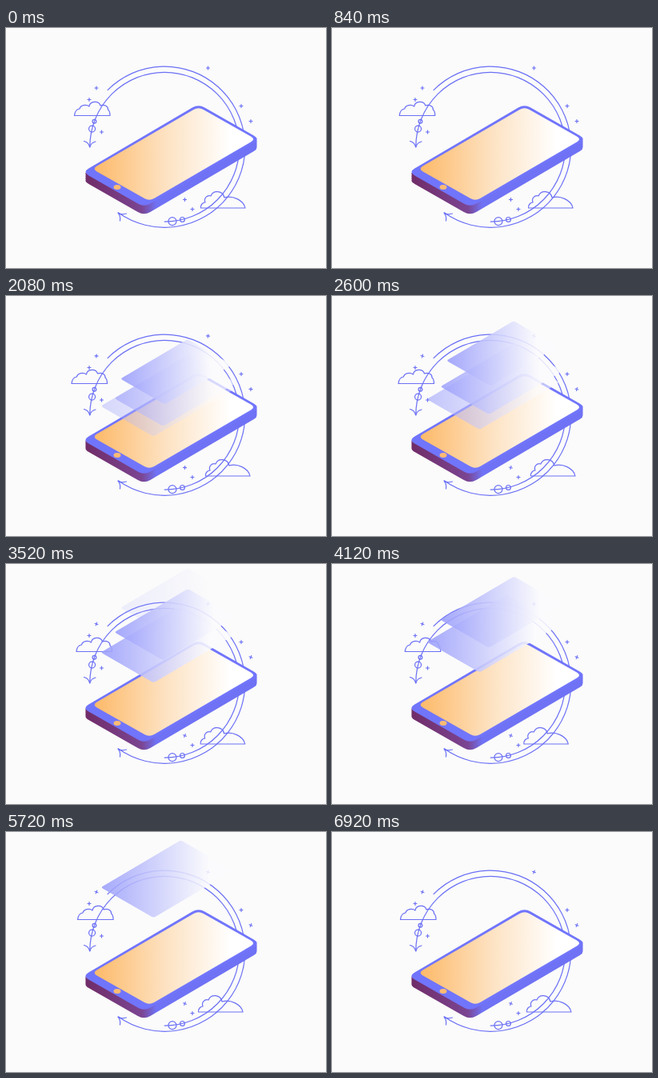
An HTML page that plays this animation: 400x300 px, repeating every 6.96 s.

```html
<!DOCTYPE html>
<html lang="en">
<head>
<meta charset="utf-8">
<title>Phone layers</title>
<style>
html, body { margin: 0; width: 100%; height: 100%; overflow: hidden; background: #fbfbfb; }
svg { display: block; width: 400px; height: 300px; }
.line { fill: none; stroke: #6b70f5; stroke-width: 1.2; stroke-linecap: round; stroke-linejoin: round; }
</style>
</head>
<body>
<svg viewBox="0 0 400 300">
  <defs>
    <linearGradient id="screenFill" gradientUnits="userSpaceOnUse" x1="110" y1="0" x2="290" y2="0">
      <stop offset="0" stop-color="#fdb968"/>
      <stop offset=".5" stop-color="#fde2c2"/>
      <stop offset=".95" stop-color="#fff"/>
    </linearGradient>
    <linearGradient id="sideFill" gradientUnits="userSpaceOnUse" x1="100" y1="0" x2="188" y2="0">
      <stop offset="0" stop-color="#702c68"/>
      <stop offset=".8" stop-color="#7b4592"/>
      <stop offset="1" stop-color="#6f72f4"/>
    </linearGradient>
    <linearGradient id="sheetFill">
      <stop offset="0" stop-color="#999dfb"/>
      <stop offset=".82" stop-color="#fbfbfd"/>
    </linearGradient>
  </defs>

  <g class="line">
    <g id="rings"></g>
    <path d="M97.500 141.500Q103.500 143 104.700 149Q106 143.500 112 142"/>
    <path d="M142.500 241Q143.500 235 140 231Q144 234 150.500 232"/>
    <g id="pluses"></g>
  </g>

  <g id="phone" transform="translate(-.4 0)"></g>

  <g class="line">
    <path id="cloudLeft" d="M.5 0C1 -5 3 -8 7 -8.500C8 -13 15 -14.500 19 -11.500C20 -18.500 31 -19 33 -12.500C38 -14.500 43 -11.500 42.500 -7.500C44.500 -6 45 -3 45 0Z"/>
    <path id="cloudRight" d="M.5 0C0 -4 3 -7 6 -7C4 -12 8 -16.500 13 -15C16 -23 28 -22 30 -13C40 -16 54 -10 56 0Z"/>
  </g>

  <g id="sheets"></g>
</svg>
<script>
const LOOP = 6960;
const $ = id => document.getElementById(id);
const clamp = v => Math.min(1, Math.max(0, v));
const ramp = (t, a, b) => clamp((t - a) / (b - a));
const ease = f => (1 - Math.cos(Math.PI * f)) / 2;
const mix = (a, b, f) => a + (b - a) * f;

function add(parent, tag, attrs) {
  const el = document.createElementNS("http://www.w3.org/2000/svg", tag);
  for (const k in attrs) el.setAttribute(k, attrs[k]);
  return parent.appendChild(el);
}

function move(el, x, y, angle = 0) {
  el.setAttribute("transform", `translate(${x} ${y}) rotate(${angle})`);
}

// Polygon path with softened corners
function rounded(points, r) {
  const n = points.length;
  const toward = (a, b) => {
    const dx = b[0] - a[0], dy = b[1] - a[1], k = r / Math.hypot(dx, dy);
    return [a[0] + dx * k, a[1] + dy * k];
  };
  return points.map((p, i) =>
    `${i ? "L" : "M"}${toward(p, points[(i + n - 1) % n])}Q${p} ${toward(p, points[(i + 1) % n])}`
  ).join("") + "Z";
}

// Parallelogram from its left corner and two edges
function slab([x, y], [ux, uy], [vx, vy]) {
  return [[x, y], [x + ux, y + uy], [x + ux + vx, y + uy + vy], [x + vx, y + vy]];
}

// Rings share one centre; angles in degrees, clockwise from the right
const outer = 100.6, inner = 93.4;
const polar = (r, deg) => {
  const a = deg * Math.PI / 180;
  return [198.2 + r * Math.cos(a), 148.7 + r * Math.sin(a)];
};
function arc(r, from, to) {
  add($("rings"), "path", { d: `M${polar(r, from)}A${r} ${r} 0 1 1 ${polar(r, to)}` });
}
function bead(deg, r) {
  const [cx, cy] = polar(inner, deg);
  add($("rings"), "circle", { cx, cy, r });
}
arc(outer, -135, 125);
arc(inner, -180, 90);
bead(194, 4);
bead(200, 2.4);
bead(84, 5);
bead(76.2, 2.9);

const phone = $("phone");
const bodyPath = rounded(slab([96, 180], [145, -85], [77, 44]), 9);
for (let d = 10.5; d > 0; d -= 1.5)
  add(phone, "path", { d: bodyPath, transform: `translate(0 ${d})`, fill: "url(#sideFill)" });
add(phone, "path", { d: bodyPath, fill: "#7175fb" });
add(phone, "path", { d: rounded(slab([108, 176], [133, -77.5], [71.5, 40.5]), 7), fill: "url(#screenFill)" });
add(phone, "ellipse", { cx: 139.4, cy: 199, rx: 4.5, ry: 2.9, fill: "#fdbb74" });

function plus([x, y]) {
  const el = add($("pluses"), "path", { d: "M-2 0H2M0 -2V2" });
  move(el, x, y);
  return { el, x, y };
}
const turning = [[252.5, 50], [113, 75], [306, 116.5], [223.5, 214.5]].map(plus);
[[104, 89.5], [119.5, 130], [294, 97.5], [233, 226.5]].forEach(plus);

// Each sheet rises from one height to another during its own span
const sheets = [
  { x: 118.5, scale: 1, start: 500, end: 7000, from: 150, to: 61 },
  { x: 135.5, scale: .92, start: 500, end: 5400, from: 150.5, to: 54.5 },
  { x: 143, scale: .84, start: 700, end: 3750, from: 140.6, to: 53.6 }
];
for (const s of sheets) {
  const edge = (x, y) => [x * s.scale, y * s.scale];
  s.el = add($("sheets"), "path", {
    d: rounded(slab([0, 0], edge(100, -59), edge(66, 38)), 3), fill: "url(#sheetFill)"
  });
}

// Clouds sway to one side, then the other, then back to rest
function sway(t, rest, first, second) {
  const a = 2080, b = 4720;
  if (t < a) return mix(rest, first, ease(t / a));
  if (t < b) return mix(first, second, ease(ramp(t, a, b)));
  return mix(second, rest, ease(ramp(t, b, LOOP)));
}

function draw(t) {
  move($("cloudLeft"), sway(t, 85, 81.5, 92), 109.5);
  move($("cloudRight"), sway(t, 243, 249, 238), 225);
  const tilt = 22 * ease(ramp(t, 1500, 3400));
  for (const p of turning) move(p.el, p.x, p.y, tilt);
  for (const s of sheets) {
    const f = ramp(t, s.start, s.end);
    move(s.el, s.x, mix(s.from, s.to, ease(f)));
    s.el.setAttribute("opacity", .88 * ramp(f, .08, .45) * (1 - ramp(f, .8, .95)));
  }
}

const start = performance.now();
function tick() {
  draw((performance.now() - start) % LOOP);
  requestAnimationFrame(tick);
}
tick();
</script>
</body>
</html>
```
